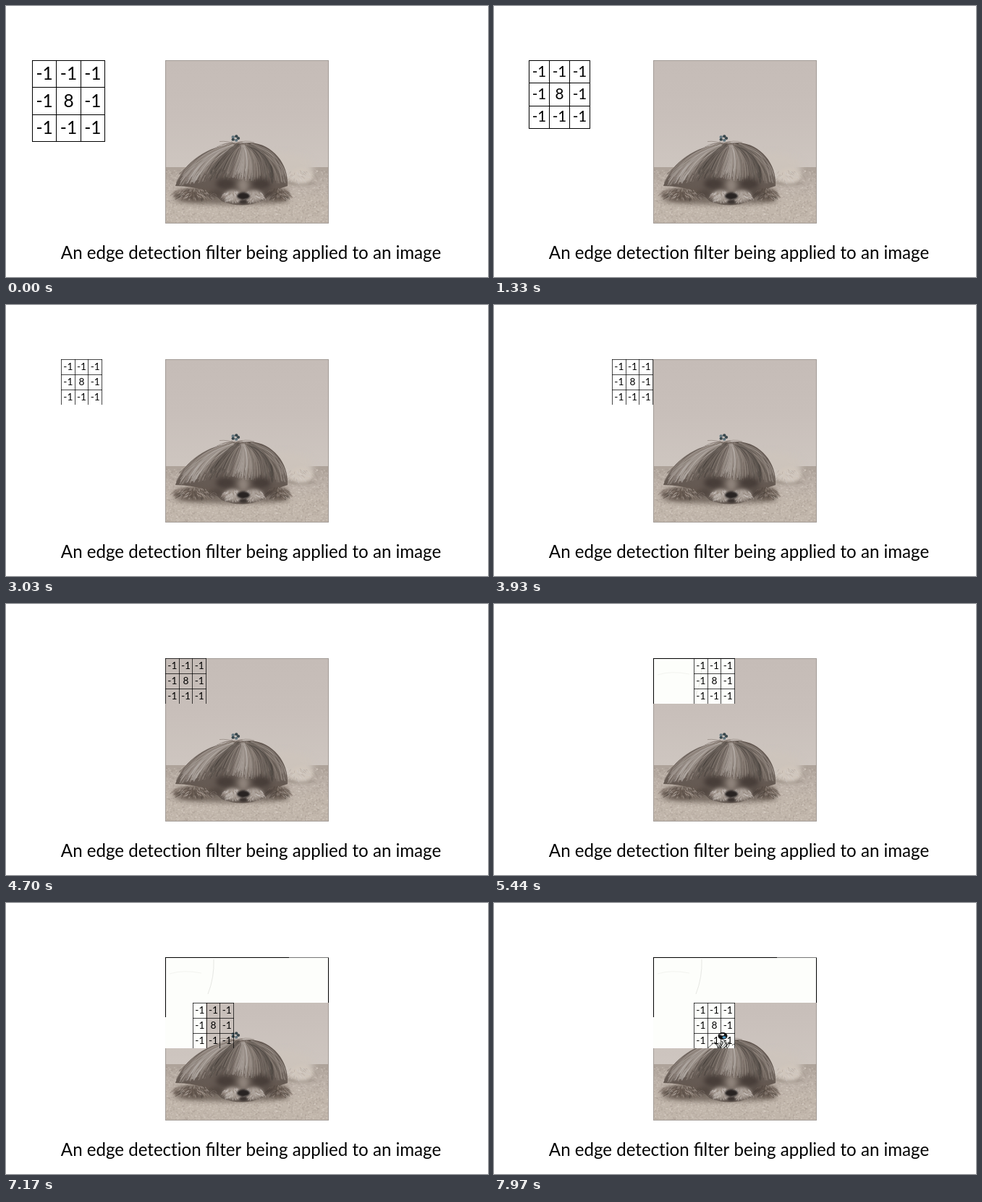
Write an HTML page with a canvas that moves like this. It is 666x375 px and loops after 8 s.

```html
<!DOCTYPE html>
<html lang="en">
<head>
<meta charset="utf-8">
<title>Edge detection filter</title>
<style>
html, body { margin: 0; width: 100%; height: 100%; overflow: hidden; background: #fff; }
canvas { display: block; }
</style>
</head>
<body>
<canvas id="stage" width="666" height="375"></canvas>
<script>
const LOOP = 8000, LEFT = 220, TOP = 75, SIZE = 226, ROW = 63;
const CELL = 18.75, PER_ROW = 12, SMALL = 56;
const ctx = document.getElementById('stage').getContext('2d');

// [start time, grid position in cells along the scan]; the scan wraps after 12 cells
const path = [
  [0, -9.8], [1330, -9.2], [1660, -8.25], [2230, -8.25], [3030, -7.7], [3400, -5.75],
  [3930, -3.05], [4700, 0], [5070, 3], [5440, 3.01], [5540, 5], [5840, 6],
  [6040, 8.1], [6470, 9], [6900, 12], [7170, 14], [7770, 15], [7970, 15.01]
];

let seed = 7;
function rnd(from = 0, to = 1) {
  seed = (seed * 16807) % 2147483647;
  return from + (to - from) * seed / 2147483647;
}

// Off-screen square that uses stage coordinates
function layer(paint) {
  const c = document.createElement('canvas');
  c.width = c.height = SIZE;
  const g = c.getContext('2d');
  g.translate(-LEFT, -TOP);
  paint(g);
  return c;
}

function oval(g, x, y, rx, ry, color, blur = 0) {
  g.filter = blur ? `blur(${blur}px)` : 'none';
  g.fillStyle = color;
  g.beginPath();
  g.ellipse(x, y, rx, ry, 0, 0, 7);
  g.fill();
  g.filter = 'none';
}

function curve(g, color, width, x0, y0, cx, cy, x1, y1) {
  g.strokeStyle = color;
  g.lineWidth = width;
  g.beginPath();
  g.moveTo(x0, y0);
  g.quadraticCurveTo(cx, cy, x1, y1);
  g.stroke();
}

function fill(g, y, h, ...colors) {
  const s = g.createLinearGradient(0, y, 0, y + h);
  colors.forEach((c, i) => s.addColorStop(i / (colors.length - 1), c));
  g.fillStyle = s;
  g.fillRect(LEFT, y, SIZE, h);
}

// Short hairs scattered over an ellipse
function tuft(g, x, y, rx, ry, count, dark, light) {
  for (let i = 0; i < count; i++) {
    const a = rnd(0, 6.28), r = Math.sqrt(rnd());
    const px = x + rx * r * Math.cos(a), py = y + ry * r * Math.sin(a), dx = Math.cos(a) * 5;
    curve(g, `hsla(25,10%,${rnd(dark, light)}%,.6)`, 1, px, py, px + dx / 2, py, px + dx, py + 3);
  }
}

function room(g) {
  fill(g, TOP, 150, '#c5bcb7', '#c8bfba', '#cec6c0');
  fill(g, 223, 78, '#ada299', '#bdb2a9', '#c2b7ac', '#c0b5aa');
  for (let i = 0; i < 2500; i++) {
    g.fillStyle = rnd() < .5 ? '#80746b24' : '#eae1d83c';
    g.fillRect(LEFT + rnd(0, SIZE), rnd(226, 301), 2, 1.5);
  }
}

function head(g) {
  g.fillStyle = '#655a53';
  g.beginPath();
  g.moveTo(318, 190);
  g.bezierCurveTo(278, 194, 246, 215, 234, 249);
  g.quadraticCurveTo(280, 250, 298, 270);
  g.quadraticCurveTo(328, 282, 358, 268);
  g.quadraticCurveTo(370, 254, 389, 249);
  g.bezierCurveTo(391, 218, 368, 191, 338, 189);
  g.fill();
  // Hair falls from the crown, light at the blaze and the ears, dark over the eyes
  for (let i = 0; i < 450; i++) {
    const p = rnd(), light = 47 + 13 * Math.cos((p - .6) * 13) + rnd(-12, 14);
    curve(g, `hsla(25,8%,${light}%,.6)`, rnd(.6, 1.6),
      311 + p * 28, rnd(190, 196), 258 + p * 124, rnd(196, 216),
      235 + p * 153, 250 - 8 * Math.sin(p * 3.14) - rnd(0, 18));
  }
}

function face(g) {
  for (const side of [-1, 1]) {
    const x = d => 328 + side * d;
    oval(g, x(25), 246, 13, 8, '#3d3430c0', 3);
    oval(g, x(37), 260, 9, 6, '#4a403ab0', 3);
    oval(g, x(14), 263, 13, 8, '#aca29a', 2);
    tuft(g, x(14), 263, 13, 8, 110, 45, 85);
  }
  oval(g, 328, 248, 7, 10, '#a2978eb0', 3);
  oval(g, 328, 263, 9, 5, '#282322', 1);
  oval(g, 328, 271, 6, 3, '#3d3532', 1);
}

const photo = layer(g => {
  room(g);
  oval(g, 385, 223, 40, 20, '#cdc4bc', 4);
  oval(g, 402, 245, 26, 3, '#a0958b', 2);
  oval(g, 408, 235, 16, 11, '#d0c6bc', 2);
  tuft(g, 400, 235, 20, 9, 60, 62, 85);
  oval(g, 312, 269, 80, 6, '#61564eb0', 3);
  head(g);
  for (const [x, rx] of [[260, 29], [377, 15]]) {
    oval(g, x, 261, rx, 9, '#65584f', 2);
    tuft(g, x, 260, rx, 8, rx * 8, 25, 72);
  }
  face(g);
  for (let i = 0; i < 14; i++)
    curve(g, '#776b63a0', .8, 318, 191, 304 + i * 2, rnd(184, 190), 291 + i * 4, rnd(187, 196));
  for (let i = 0; i < 5; i++)
    oval(g, 317 + 4 * Math.cos(i * 1.26), 183 + 3 * Math.sin(i * 1.26), 2.2, 2, i % 2 ? '#63767f' : '#39474c');
  g.strokeStyle = '#a39c97';
  g.lineWidth = 1;
  g.strokeRect(220.5, 75.5, 225, 225);
});

const edges = layer(g => {
  fill(g, TOP, SIZE, '#fdfefb', '#fdfefb');
  curve(g, '#e6e7e3', 1, 287, 78, 288, 103, 279, 126);
  curve(g, '#f3f4f0', 1, 226, 98, 245, 92, 270, 97);
  g.fillStyle = '#000';
  g.fillRect(LEFT, TOP, 171, 1);
  g.fillRect(LEFT, TOP, 1, 83);
  g.fillRect(445, TOP, 1, ROW);
  g.fillStyle = '#777';
  g.fillRect(391, TOP, 55, 1);
  for (let i = 0; i < 14; i++) {
    const x = rnd(300, 330);
    curve(g, '#222', .8, x, rnd(190, 197), x + 5, rnd(191, 196), x + rnd(-8, 10), 202);
  }
  oval(g, 316, 184, 6.5, 5, '#151515');
  oval(g, 315, 182, 3, 1.5, '#fff');
  oval(g, 318, 186, 2.5, 1.8, '#4b9cc8');
});

function text(s, x, y, size) {
  ctx.font = `${size}px Lato, "Open Sans", sans-serif`;
  ctx.fillText(s, x, y);
}

function grid(x, y, w) {
  const h = Math.round(w * 1.12), small = w === SMALL;
  ctx.fillStyle = small ? '#000000b8' : '#000';
  for (let i = 0; i < 4; i++) {
    ctx.fillRect(x + Math.round(w * i / 3), y, 1, h);
    if (i < 3 || !small) ctx.fillRect(x, y + Math.round(h * i / 3), w + 1, 1);
  }
  ctx.fillStyle = '#000';
  for (let i = 0; i < 9; i++)
    text(i === 4 ? '8' : '-1', x + w * (i % 3 + .5) / 3 + .5,
      y + h * (Math.floor(i / 3) + .5) / 3 + w * .085, w * .245);
}

function draw() {
  const t = performance.now() % LOOP;
  const step = path.findLastIndex(p => p[0] <= t), pos = path[step][1];
  const row = Math.max(0, Math.floor(pos / PER_ROW)), col = pos % PER_ROW;
  ctx.fillStyle = '#fff';
  ctx.fillRect(0, 0, 666, 375);
  ctx.drawImage(photo, LEFT, TOP);
  // Finished rows are filtered whole, the current one in windows of three cells
  for (let r = 0; r <= row; r++) {
    const w = r < row ? SIZE : Math.round(CELL * 3 * Math.ceil(col / 3));
    if (w > 0) ctx.drawImage(edges, 0, r * ROW, w, ROW, LEFT, TOP + r * ROW, w, ROW);
  }
  grid(LEFT + Math.round(col * CELL), TOP + row * ROW, Math.max(SMALL, 100 - 16 * step));
  // The zero-width non-joiner keeps "t" and "i" apart
  text('An edge detect\u200cion filter being applied to an image', 338.5, 350, 24.1);
  requestAnimationFrame(draw);
}

ctx.textAlign = 'center';
draw();
</script>
</body>
</html>
```
